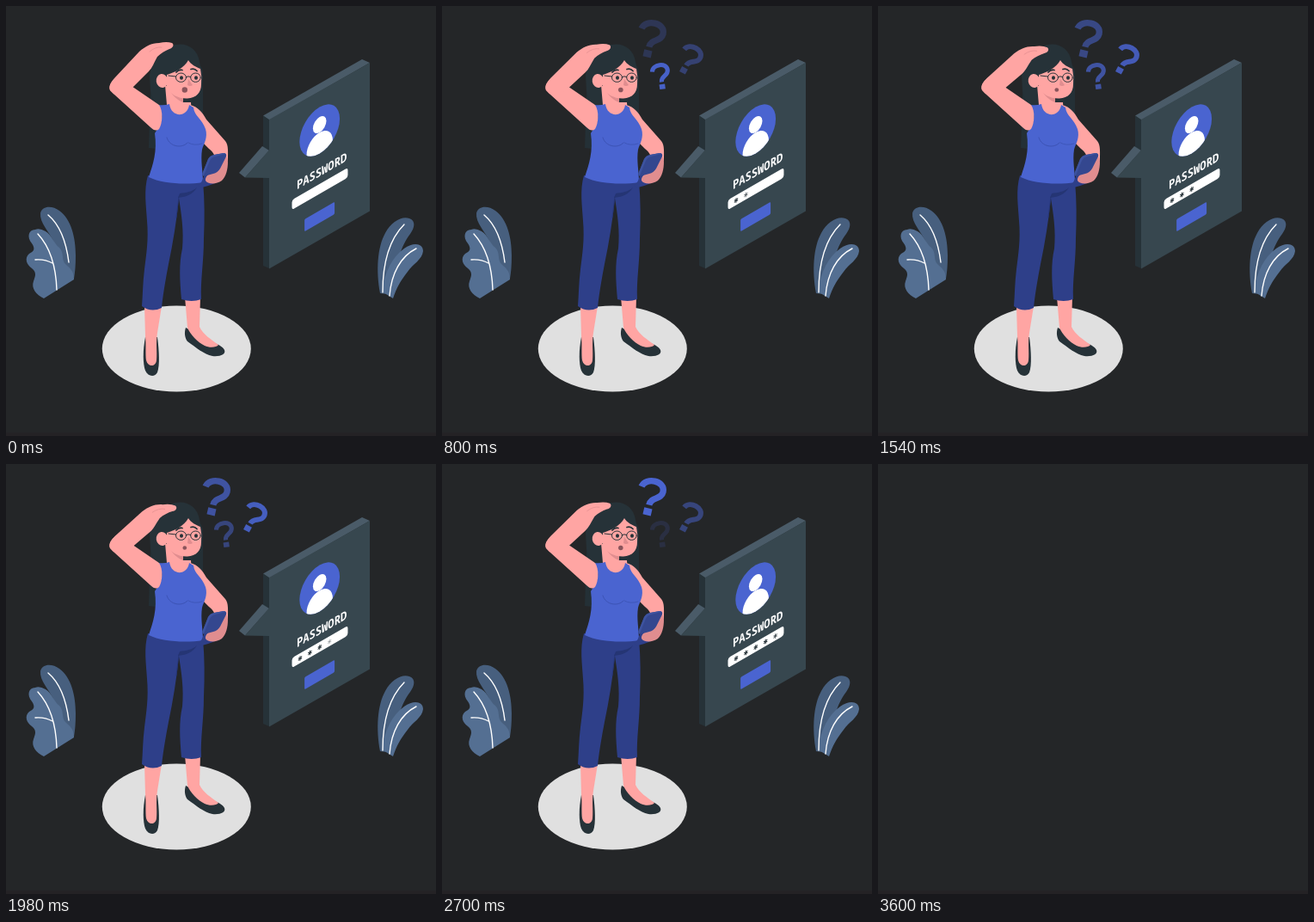
Recreate the animation shown at these times as an HTML page with a canvas. Size 500 px wide and 500 px high, loop 3.62 s.

```html
<!DOCTYPE html>
<html lang="en">
<head>
<meta charset="utf-8">
<title>Forgotten password</title>
<style>
  html, body { margin: 0; width: 100%; height: 100%; overflow: hidden; background: #242628; }
  canvas { display: block; width: 500px; height: 500px; }
</style>
</head>
<body>
<canvas id="stage" width="500" height="500"></canvas>
<script>
const ctx = document.getElementById('stage').getContext('2d');
const LOOP = 3620, BLANK_AT = 3600;
const C = {
  bg: '#242628', skin: '#ffa5a3', skinShade: '#e08d8f', hair: '#263238',
  blue: '#4a64d0', blueLine: '#3c53b4', jeans: '#2e3f89', jeansDark: '#253574',
  leafBack: '#475f7e', leafFront: '#546f92', floor: '#e0e0e0',
  panel: '#37474f', panelSide: '#263238', panelTop: '#4a5b68', white: '#ffffff'
};

const clamp = v => Math.max(0, Math.min(1, v));
const ramp = (t, from, to) => clamp((t - from) / (to - from));
const smooth = v => v * v * (3 - 2 * v);

// Linear interpolation through [time, value] pairs.
function track(t, keys) {
  for (let i = 1; i < keys.length; i++) {
    const [t0, v0] = keys[i - 1], [t1, v1] = keys[i];
    if (t <= t1) return v0 + (v1 - v0) * ramp(t, t0, t1);
  }
  return keys[keys.length - 1][1];
}

function fill(color, d) {
  ctx.fillStyle = color;
  ctx.fill(new Path2D(d));
}

function line(color, width, d, cap = 'round') {
  ctx.strokeStyle = color;
  ctx.lineWidth = width;
  ctx.lineCap = cap;
  ctx.stroke(new Path2D(d));
}

function oval(color, x, y, rx, ry = rx, turn = 0) {
  ctx.fillStyle = color;
  ctx.beginPath();
  ctx.ellipse(x, y, rx, ry, turn, 0, Math.PI * 2);
  ctx.fill();
}

function roundBox(color, x, y, w, h, r) {
  ctx.fillStyle = color;
  ctx.beginPath();
  ctx.roundRect(x, y, w, h, r);
  ctx.fill();
}

function group(draw) {
  ctx.save();
  draw();
  ctx.restore();
}

// Places drawing on the panel's isometric plane with its origin at (x, y).
function onPanel(x, y, draw) {
  group(() => {
    ctx.transform(0.866, -0.5, 0, 1, x, y);
    draw();
  });
}

function drawPlants() {
  fill(C.leafBack, 'M40 241 C42 232 54 232 62 238 C76 248 81 270 81 290 Q81 306 79 317 L62 322 L56 275 C50 262 39 252 40 241Z');
  fill(C.leafFront, 'M34 260 C26 260 24 269 30 276 C34 282 33 285 27 288 C21 293 24 301 30 305 C36 310 34 314 32 320 C29 328 35 336 44 340 L79 318 C79 307 73 304 69 300 C64 295 68 287 62 281 C56 277 54 267 46 262 Q39 258 34 260Z');
  line(C.white, 1.4, 'M49 243 C62 254 70 274 73 298');
  line(C.white, 1.4, 'M37 265 C50 279 58 300 59 330');
  line(C.white, 1.4, 'M34 295 Q45 294 54 299');

  fill(C.leafBack, 'M435 334 C430 307 432 280 441 264 C448 251 460 244 469 247 C477 250 475 258 470 265 C460 278 452 299 451 336Z');
  fill(C.leafFront, 'M437 332 C441 308 449 292 463 282 C474 274 485 276 485 285 C484 295 473 300 467 309 C459 319 454 328 450 340Z');
  line(C.white, 1.4, 'M463 254 C446 271 438 299 438 333');
  line(C.white, 1.4, 'M477 282 C459 291 448 311 446 337');
}

function drawPanel() {
  fill(C.panelTop, 'M299 127.5 L414 62 L423 66 L306 133Z');
  fill(C.panelSide, 'M299 127.5 L306 132 V305 L299 302Z');
  fill(C.panel, 'M306 132 L423 66 V238.5 L306 305.5Z');
  fill(C.panelTop, 'M271 194 L298 163 L306 168 L278 199.5Z');
  fill(C.panel, 'M278 199.5 L306 167.5 V200Z');

  onPanel(364.7, 144.5, () => {
    oval(C.blue, 0, 0, 27);
    ctx.beginPath();
    ctx.arc(0, 0, 27, 0, Math.PI * 2);
    ctx.clip();
    oval(C.white, 0, -6.5, 9);
    fill(C.white, 'M-17.5 28 V20 A17.5 17.5 0 0 1 17.5 20 V28Z');
  });

  onPanel(338, 213.5, () => {
    ctx.fillStyle = C.white;
    ctx.font = '600 14px "Noto Sans Mono", monospace';
    ctx.fillText('PASSWORD', 0, 0);
  });

  onPanel(332.5, 225.5, () => roundBox(C.white, 0, 0, 75, 11.5, 3));
}

function drawStars(t) {
  const out = 1 - ramp(t, 3100, 3540);
  for (let i = 0; i < 5; i++) {
    const start = 60 + i * 622;
    ctx.globalAlpha = ramp(t, start, start + 210) * out;
    if (!ctx.globalAlpha) continue;
    onPanel(342 + i * 11.4, 226 - i * 6.5, () => {
      for (let k = 0; k < 3; k++) {
        ctx.rotate(Math.PI / 3);
        line(C.hair, 1.2, 'M0 -2.8 V2.8', 'butt');
      }
    });
  }
  ctx.globalAlpha = 1;
}

function drawButton(t) {
  const press = ramp(t, 3100, 3300) * (1 - ramp(t, 3300, 3520));
  onPanel(364.6, 245, () => {
    const s = 1 - 0.15 * smooth(press);
    ctx.scale(s, s);
    roundBox(C.blue, -20.2, -7.2, 40.4, 14.4, 1.5);
  });
}

function drawQuestion(x, y, size, degrees, alpha) {
  group(() => {
    ctx.globalAlpha = alpha;
    ctx.translate(x, y);
    ctx.rotate(degrees * Math.PI / 180);
    ctx.scale(size, size);
    line(C.blue, 0.17, 'M-.31 -.21 C-.26 -.5 .29 -.51 .29 -.2 C.29 .03 0 -.01 0 .23', 'butt');
    ctx.fillStyle = C.blue;
    ctx.fillRect(-0.11, 0.32, 0.22, 0.19);
  });
}

function drawQuestions(t) {
  drawQuestion(243, 38, 43, 13, track(t, [[0, 0], [460, 0.13], [2700, 1], [3300, 0.5], [3600, 0.25]]));
  drawQuestion(287.8, 62, 35, 28, track(t, [[0, 0], [1800, 1], [3600, 0]]));
  drawQuestion(254.5, 81.5, 30, -8, track(t, [[0, 0], [600, 0.9], [1000, 1], [1980, 0.5], [2700, 0.16], [3600, 0.02]]));
}

function drawLegs() {
  fill(C.hair, 'M162 385 C159 400 159 416 162 424 C165 431 173 432 176 426 C179 418 178 400 176 385Z');
  fill(C.skin, 'M161 349 L162 384 C163 395 162 405 163 412 C165 420 174 420 175 412 C176 402 174 392 176 380 L181 349Z');
  fill(C.hair, 'M209 374 C207 380 208 386 211 390 C221 397 230 405 240 407 C249 408 256 405 254 400 C252 396 247 394 243 392Z');
  fill(C.skin, 'M208 338 L211 374 C214 382 223 391 231 395 C237 398 245 397 247 394 C239 388 229 382 225 373 L226 338Z');

  fill(C.jeans, 'M165 197 C160 214 163 232 164 250 C166 272 163 290 161 306 C159 322 159 336 158 349 Q169 357 181 351 C183 332 186 316 189 300 Q197 262 201 224 C204 242 207 262 205 282 C201 300 202 318 204 341 Q216 345 227 341 C226 318 230 298 230 270 C231 248 231 225 229 204Z');
  fill(C.jeansDark, 'M200 223 C208 222 217 220 222 211 C217 216 209 217 202 218Z');
  line(C.jeansDark, 0.9, 'M201 222 L198 246');
}

function drawBody() {
  fill(C.skin, 'M214 115 C223 117 228 123 233 132 L255 157 C259 162 258 170 258 180 L243 181 C244 174 241 170 236 166 L226 156Z');
  fill(C.skin, 'M189 112 H215 L216 128 H192Z');
  fill(C.blue, 'M177 115 Q184 116 190 114 C192 130 211 130 213 115 L218 118 C219 128 228 131 232 143 C235 153 230 160 228 167 C226 180 229 192 229 205 C210 208 182 207 166 199 C171 183 176 170 173 148 L178 140 C182 134 183 125 177 115Z');
  line(C.blueLine, 1, 'M187 153 C190 164 205 166 211 159');
  line(C.blueLine, 0.8, 'M212 159 Q219 163 228 160');

  // Hand holding the phone.
  fill(C.jeans, 'M223 209 C230 204 228 198 233 195 L246 205 Q236 209 228 211Z');
  fill(C.skinShade, 'M243 178 C250 173 258 172 258 181 C258 190 256 198 251 203 C244 208 234 207 232 203 C231 199 236 195 239 193Z');
  fill('#34478f', 'M235 178 Q237 174 242 173 L253 171 Q257 171 256 175 L249 189 Q246 194 241 195 L230 198 Q227 197 229 193Z');
  fill('#3d539f', 'M235 178 Q237 174 242 173 L253 171 Q255 171 255 172 L243 175 Q239 176 237 180 L230 197 Q227 197 229 193Z');
}

function drawHead(sway) {
  fill('#243036', 'M169 76 L166 165 L175 166 L186 120 H206 L229 130 V76 Q226 65 215 62Z');
  fill(C.hair, 'M167 80 C170 63 181 54 192 47 C207 40 223 49 225 65 L228 79 L216 112 L186 119 Q172 116 168 99Z');
  fill(C.skin, 'M185 92 L205 103 L206 116 C210 126 193 126 187 115Z');
  fill(C.skinShade, 'M190 97 L206 107 V112 Q195 108 190 97Z');
  fill(C.skin, 'M187 80 C197 77 207 72 212 63 C215 68 221 71 226 73 Q228 82 227 91 C227 101 221 107 211 107.5 C201 108 191 103 187 95Z');
  oval(C.skin, 181.5, 87, 6.8, 8, -0.15);

  line(C.hair, 1.8, 'M198 77 Q201 73.5 205 74.5');
  line(C.hair, 1.8, 'M215 73.5 Q219 72 222 75.5');
  fill(C.skinShade, 'M212 85 L217 92 Q214 94 211 92Z');
  for (const [x, r] of [[203.5, 6], [220.5, 5.8]]) {
    oval(C.hair, x + 0.5, 83.5, 2, 2.3);
    ctx.strokeStyle = C.hair;
    ctx.lineWidth = 1;
    ctx.beginPath();
    ctx.ellipse(x, 83.2, r, 5.2, 0, 0, Math.PI * 2);
    ctx.stroke();
  }
  line(C.hair, 1, 'M189 81 L197.5 82 M209.5 82.5 Q212 81 214.7 82.5');
  oval('#8a545b', 207.8, 97.5, 3.2 * (1 - 0.28 * sway));
}

function drawRaisedArm(sway) {
  fill(C.skin, 'M121 98 C119 91 124 86 130 82 L148 94.5 L178 115 C183 122 182 137 178 143 Q174 147 168 141 L126 103Z');
  group(() => {
    ctx.translate(130, 94);
    ctx.rotate(0.085 * sway);
    ctx.translate(-130, -94);
    fill(C.skin, 'M121 98 C119 93 122 89 126 84 L155 53 C162 47 169 43 178 43 Q187 41 193 43 C196 45 194 49 190 50 C185 52 180 55 176 59 C172 66 170 72 166 76 L147 95 Q135 108 125 102Z');
    line(C.skinShade, 0.7, 'M167 53 Q174 47 181 48');
  });
}

function draw(t) {
  ctx.fillStyle = C.bg;
  ctx.fillRect(0, 0, 500, 500);
  ctx.fillStyle = '#242225';
  ctx.fillRect(0, 496, 500, 4);
  if (t >= BLANK_AT) return;

  const sway = (1 - Math.cos(t / BLANK_AT * Math.PI * 2)) / 2;
  drawPlants();
  oval(C.floor, 198.3, 398.5, 86.5, 50);
  drawPanel();
  drawStars(t);
  drawButton(t);
  drawQuestions(t);
  drawLegs();
  drawHead(sway);
  drawBody();
  drawRaisedArm(sway);
}

function tick() {
  draw(performance.now() % LOOP);
  requestAnimationFrame(tick);
}
tick();
</script>
</body>
</html>
```
